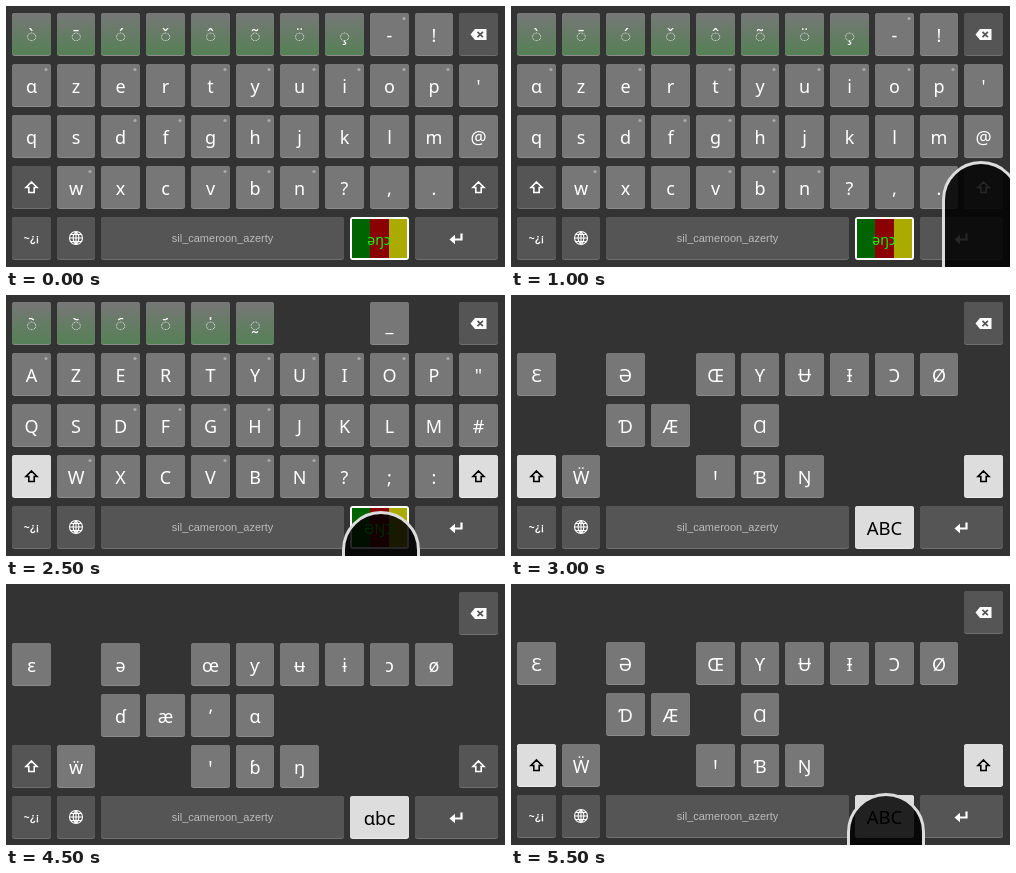
Write an HTML page that moves like this. It is 499 px wide and 261 px high and loops after 6000 ms.

```html
<!DOCTYPE html>
<html lang="en">
<head>
<meta charset="utf-8">
<style>
  html, body { margin: 0; width: 100%; height: 100%; overflow: hidden; background: #333; }
  svg { display: block; }
  text { text-anchor: middle; }
  .glyph { font: 500 18px "Noto Sans", "DejaVu Sans", sans-serif; fill: #fff; }
  .layer { font: 18.5px "Noto Sans", "DejaVu Sans", sans-serif; fill: #000; }
  .tones { font: 14px "Noto Sans", "DejaVu Sans", sans-serif; fill: #0f0; }
  .symbols { font: bold 10px "Liberation Sans", Arial, sans-serif; fill: #fff; }
  .space { font: 11px "Liberation Sans", Arial, sans-serif; fill: #bbb; }
</style>
</head>
<body>
<svg id="stage" width="499" height="261" viewBox="0 0 499 261">
  <defs>
    <linearGradient id="green" x1="0" y1="0" x2="0" y2="1">
      <stop offset="0" stop-color="#777"/>
      <stop offset="1" stop-color="#558055"/>
    </linearGradient>
  </defs>
  <g id="board"></g>
</svg>
<script>
const LOOP = 6000;
const BLANK = '~';
const DARK = '#555', LIT = '#ddd';
const marks = codes => codes.map(code => '◌' + String.fromCharCode(code)).join(' ');

// Rows hold eleven columns; backspace and shift keys are added separately.
const layers = {
  lower: {
    rows: [
      marks([0x300, 0x304, 0x301, 0x30c, 0x302, 0x303, 0x308, 0x327]) + ' - !',
      "ɑ z e r t y u i o p '",
      'q s d f g h j k l m @',
      '~ w x c v b n ? , .'
    ],
    tones: 'əŋɔ', dash: true
  },
  upper: {
    rows: [
      marks([0x1dc6, 0x1dc5, 0x1dc7, 0x1dc4, 0x30d, 0x330]) + ' ~ ~ _',
      'A Z E R T Y U I O P "',
      'Q S D F G H J K L M #',
      '~ W X C V B N ? ; :'
    ],
    tones: 'ƏŊƆ', shift: true
  },
  extraUpper: {
    rows: ['', 'Ɛ ~ Ə ~ Œ Ƴ Ʉ Ɨ Ɔ Ø', '~ ~ Ɗ Æ ~ Ɑ', '~ Ẅ ~ ~ Ꞌ Ɓ Ŋ'],
    label: 'ABC', shift: true
  },
  extraLower: {
    rows: ['', 'ɛ ~ ə ~ œ ƴ ʉ ɨ ɔ ø', '~ ~ ɗ æ ʼ ɑ', '~ ẅ ~ ~ ꞌ ɓ ŋ'],
    label: 'ɑbc', top: 1
  }
};

// Columns with a long-press dot, per row.
const hints = [[], [0, 2, 4, 5, 6, 7, 8, 9], [2, 3, 4, 5], [1, 4, 5, 6]];

const scenes = [
  { at: 0, layer: 'lower' },
  { at: 1000, layer: 'lower', touch: [431, 155] },
  { at: 1500, layer: 'upper' },
  { at: 2500, layer: 'upper', touch: [336, 216] },
  { at: 3000, layer: 'extraUpper' },
  { at: 4000, layer: 'extraLower', touch: [434, 168] },
  { at: 4500, layer: 'extraLower' },
  { at: 5500, layer: 'extraUpper', touch: [336, 209] }
];

const left = col => Math.floor(6.3 + 44.75 * col);
const right = col => Math.floor(45 + 44.75 * col);
const center = col => (left(col) + right(col)) / 2;
const rowTop = row => 7 + 51 * row;

const rect = (x, y, w, h, fill, r = 0) =>
  `<rect x="${x}" y="${y}" width="${w}" height="${h}" rx="${r}" fill="${fill}"/>`;
const text = (x, y, content, kind) => `<text x="${x}" y="${y}" class="${kind}">${content}</text>`;
const line = (d, color, width) =>
  `<path d="${d}" fill="none" stroke="${color}" stroke-width="${width}"/>`;

function key(x1, x2, row, fill) {
  const edge = fill === DARK ? '#707070' : fill === LIT ? '#eee' : '#8c8c8c';
  const y = rowTop(row), w = x2 - x1;
  return rect(x1, y, w, 43, edge, 3) + rect(x1, y, w, 42, fill, 3);
}

const columnKey = (col, row, fill) => key(left(col), right(col), row, fill);

function letterKey(char, col, row, hinted) {
  const fill = char.startsWith('◌') ? 'url(#green)' : '#777';
  const dot = hinted ? `<circle cx="${right(col) - 5}" cy="${rowTop(row) + 5.5}" r="1.6" fill="#aaa"/>` : '';
  return columnKey(col, row, fill) + text(center(col), rowTop(row) + 29, char, 'glyph') + dot;
}

function shiftKey(col, on) {
  const arrow = `M${center(col)} 176l5.5 5.5h-2.8v5h-5.4v-5h-2.8z`;
  return columnKey(col, 3, on ? LIT : DARK) + line(arrow, on ? '#000' : '#fff', 1.6);
}

const backspaceKey = () => columnKey(10, 0, DARK) +
  '<path d="M464.5 28.5l4.5-5.5h11.5v11h-11.5z" fill="#fff"/>' +
  line('M471.5 25.8l5.4 5.4m0-5.4l-5.4 5.4', DARK, 1.7);

const globeKey = () => columnKey(1, 4, DARK) +
  line('M63.5 232a6.5 6.5 0 1 0 13 0a6.5 6.5 0 1 0-13 0h13M70 225.5v13' +
    'M70 225.5q-6 6.5 0 13q6-6.5 0-13M64.8 228.5h10.4M64.8 235.5h10.4', '#fff', 1.1);

const enterKey = () => key(409, 492, 4, DARK) +
  '<path d="M443.5 233.5l5.5-4.7v9.4z" fill="#fff"/>' +
  line('M448 233.5h7.5v-6', '#fff', 2.2);

function layerKey({ label, tones }) {
  if (label) return key(344, 403, 4, LIT) + text(373.5, 240, label, 'layer');
  return rect(344, 211, 59, 43, '#fff', 3) +
    rect(346, 213, 18, 39, '#006400') +
    rect(364, 213, 19, 39, '#8b0000') +
    rect(383, 213, 18, 39, '#aa0') +
    text(373, 239, tones, 'tones');
}

const finger = ([x, y]) =>
  `<rect x="${x + 1.5}" y="${y + 1.5}" width="75" height="200" rx="37.5"
    fill="#000" fill-opacity=".85" stroke="#ddd" stroke-width="3"/>`;

function draw({ layer: name, touch }) {
  const layer = layers[name];
  const letters = layer.rows.flatMap((chars, row) =>
    chars.split(' ').map((char, col) => {
      if (!char || char === BLANK) return '';
      const hinted = !layer.label && hints[row].includes(col) || layer.dash && char === '-';
      return letterKey(char, col, row, hinted);
    }));
  const controls = [
    backspaceKey(), shiftKey(0, layer.shift), shiftKey(10, layer.shift),
    columnKey(0, 4, DARK), text(25.5, 236, '~¿¡', 'symbols'), globeKey(),
    key(95, 338, 4, DARK), text(216.5, 236, 'sil_cameroon_azerty', 'space'),
    layerKey(layer), enterKey()
  ];
  const keys = [...letters, ...controls].join('');
  return `<g transform="translate(0 ${layer.top || 0})">${keys}${touch ? finger(touch) : ''}</g>`;
}

const board = document.getElementById('board');
let current;
function tick() {
  const time = performance.now() % LOOP;
  const scene = scenes.findLast(({ at }) => at <= time);
  if (scene !== current) {
    current = scene;
    board.innerHTML = draw(scene);
  }
  requestAnimationFrame(tick);
}
tick();
</script>
</body>
</html>
```
